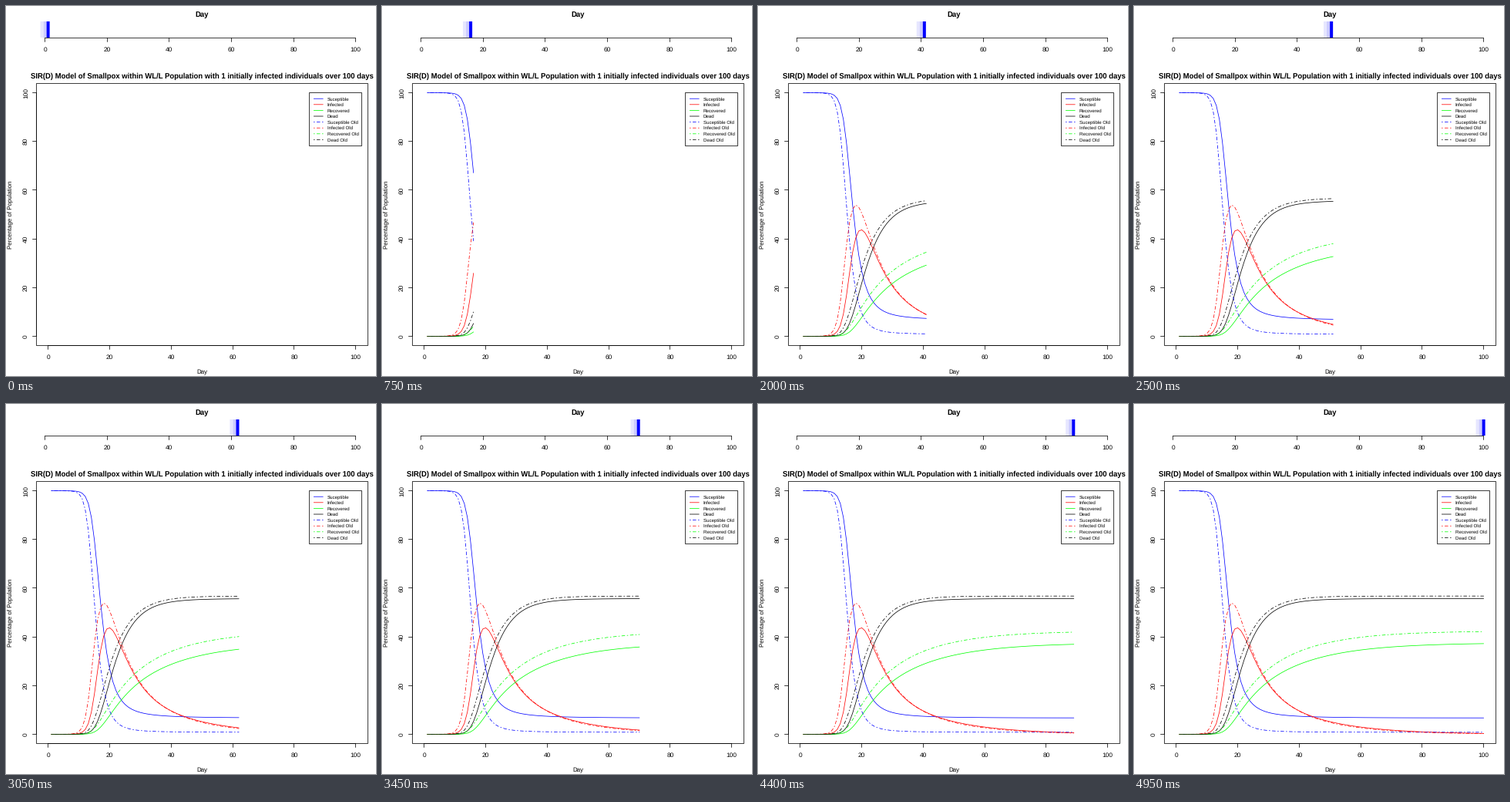
Write a matplotlib script that moves like this. It is 480 px wide and 480 px high and loops after 5000 ms.

```python
import numpy as np
import matplotlib.pyplot as plt
from matplotlib.animation import FuncAnimation
from matplotlib.patches import Rectangle

plt.rcParams.update({
    "font.family": "Liberation Sans",
    "text.hinting": "none",
    "path.simplify": False,
    "path.snap": False,
})

SIZE = 480
DPI = 96
PT = 72 / DPI        # points per pixel
DAYS = 100
BASE = 7.92          # text size in pixels
THIN = 0.75          # line width in pixels
DOT_DASH = (0, tuple(n / THIN for n in (1, 3, 4, 3)))
COLORS = ["#0000ff", "#ff0000", "#00ff00", "#000000"]
NAMES = ["Suceptible", "Infected", "Recovered", "Dead"]


def outbreak(half_day, immune, spread, surge, severe, death, leave, heal):
    """Daily percentages of susceptible, infected, recovered and dead.

    Severe cases leave at a quick rate, mostly by death; mild ones heal slowly.
    The time axis is shifted so that half are infected on half_day.
    """
    step = 0.02
    s, dead = 100.0, 0.0
    bad, mild = 1e-4 * severe, 1e-4 * (1 - severe)
    rows = []
    for _ in range(int(120 / step)):
        rows.append((s, bad + mild, 100 - s - bad - mild - dead, dead))
        rate = spread + surge * (s / 100) ** 2
        new = rate * (s - immune) * (bad + mild)
        s -= step * new
        dead += step * death * bad
        bad += step * (severe * new - leave * bad)
        mild += step * ((1 - severe) * new - heal * mild)
    table = np.clip(rows, 0, 100).T
    clock = step * np.arange(len(rows))
    clock += half_day - np.interp(-50, -table[0], clock)
    days = np.arange(1, DAYS + 1)
    return [np.interp(days, clock, column) for column in table]


def px(day):
    return 54.92 + 3.987 * day


def py(percent):
    return 428.4 - 3.158 * percent


def bar_x(day):
    return 50.6 + 4.03 * day


def crisp(v):
    return np.floor(v) + 0.5


fig = plt.figure(figsize=(SIZE / DPI, SIZE / DPI), dpi=DPI, facecolor="white")
ax = fig.add_axes([0, 0, 1, 1])
ax.set_xlim(0, SIZE)
ax.set_ylim(SIZE, 0)
ax.axis("off")


def rule(x0, y0, x1, y1):
    ax.plot(crisp(np.array([x0, x1])), crisp(np.array([y0, y1])),
            color="black", lw=THIN * PT, solid_capstyle="round", zorder=4)


def frame(x0, y0, x1, y1):
    x0, y0, x1, y1 = (crisp(v) for v in (x0, y0, x1, y1))
    ax.add_patch(Rectangle((x0, y0), x1 - x0, y1 - y0, fc="white", ec="black",
                           lw=THIN * PT, zorder=1))


def label(x, y, text, size=BASE, **kw):
    kw = {"ha": "center", "va": "baseline", "rotation_mode": "anchor", **kw}
    ax.text(x, y, text, fontsize=size * PT, color="black", zorder=5, **kw)


def stroke(x, y, color, dashed):
    style = DOT_DASH if dashed else "-"
    return ax.plot(x, y, color=color, lw=THIN * PT, ls=style, zorder=3,
                   solid_capstyle="round", dash_capstyle="round",
                   solid_joinstyle="round", dash_joinstyle="round")[0]


TICK = 8.4


def day_axis(y, to_x):
    rule(to_x(0), y, to_x(100), y)
    for day in range(0, 101, 20):
        rule(to_x(day), y, to_x(day), y + 5)
        label(to_x(day), y + 17.8, str(day), TICK)


# Progress strip
label(254.3, 14, "Day", 1.2 * BASE, weight="bold")
day_axis(41, bar_x)
bars = []
for shade in ("#e6e6ff", "#ccccff", "#0000ff"):
    bars.append(ax.add_patch(Rectangle((0, 20), 4.03, 21, fc=shade, lw=0,
                                       zorder=2)))

# Main chart
label(254.3, 94, "SIR(D) Model of Smallpox within WL/L Population with "
      "1 initially infected individuals over 100 days",
      1.2 * BASE, weight="bold")
frame(39, 100, 469, 440)
day_axis(440.5, px)
rule(39, py(0), 39, py(100))
for percent in range(0, 101, 20):
    rule(34, py(percent), 39, py(percent))
    label(28, py(percent), str(percent), TICK, rotation=90)
label(254.3, 477, "Day")
label(8.3, 270.5, "Percentage of Population", rotation=90)

# Legend
frame(393, 112, 461, 181)
for row in range(8):
    old, kind = divmod(row, 4)
    y = 120.2 + 7.6 * row
    stroke([399.3, 411.3], [y, y], COLORS[kind], old)
    label(416.7, y + 2.1, NAMES[kind] + (" Old" if old else ""), 6.1,
          ha="left")

# Curves
new = outbreak(half_day=17.33, immune=6.3, spread=0.0062, surge=0.0049,
               severe=0.7, death=0.175, leave=0.205, heal=0.055)
old = outbreak(half_day=15.26, immune=0.7, spread=0.0069, surge=0.004,
               severe=0.671, death=0.145, leave=0.17, heal=0.058)
xs = px(np.arange(1, DAYS + 1))
ys = [py(curve) for curve in new + old]
lines = [stroke([], [], COLORS[i % 4], i >= 4) for i in range(8)]


def draw(i):
    day = i + 1
    for line, y in zip(lines, ys):
        line.set_data(xs[:day], y[:day])
    for bar, lag in zip(bars, (2.5, 1.5, 0.5)):
        bar.set_x(bar_x(day - lag))
    return lines + bars


anim = FuncAnimation(fig, draw, frames=DAYS, interval=50, repeat=True,
                     repeat_delay=0, blit=False)
plt.show()
```
